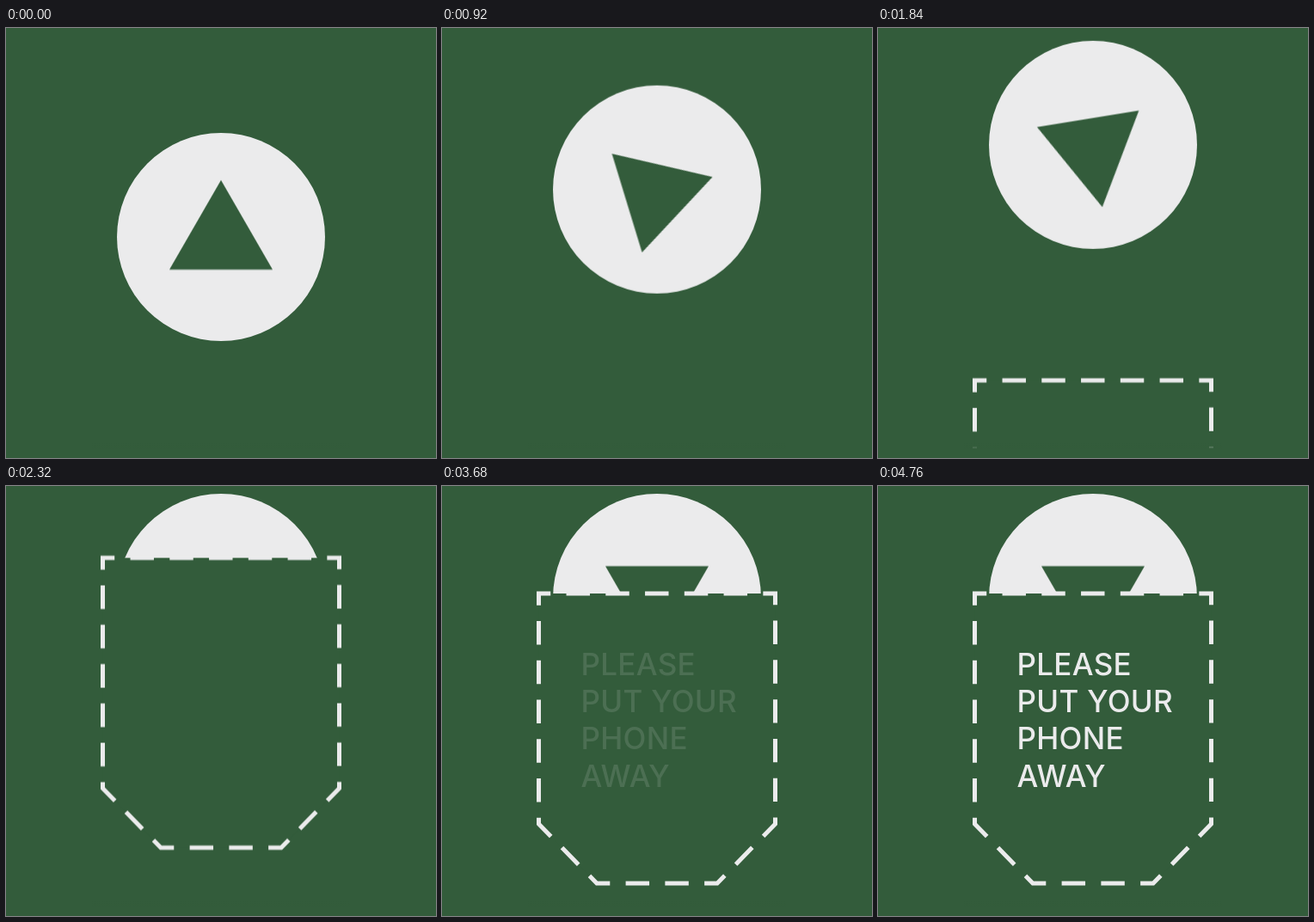
Animation of 500 by 500 pixels, one loop 8000 ms. Source, as an HTML page:

```html
<!DOCTYPE html>
<html lang="en">
<head>
<meta charset="utf-8">
<title>Please put your phone away</title>
<style>
  html, body { margin: 0; width: 100%; height: 100%; overflow: hidden; background: #335c3b; }
  svg { display: block; width: 100vw; height: 100vh; }
  .light { fill: #ebebec; }
  .green { fill: #335c3b; }
  #seam { stroke: #ebebec; stroke-width: 5; stroke-dasharray: 6 4; stroke-dashoffset: 3; }
  #words { font: 500 35px Inter, "Liberation Sans", sans-serif; letter-spacing: .3px; opacity: 0; }
</style>
</head>
<body>
<svg viewBox="0 0 500 500">
  <defs>
    <linearGradient id="fade" x1="0" y1="0" x2="0" y2="1">
      <stop offset="0" stop-color="#335c3b" stop-opacity="0"/>
      <stop offset="1" stop-color="#335c3b"/>
    </linearGradient>
  </defs>
  <g id="disc"><circle class="light" cx="250" r="121"/></g>
  <g id="lift"><path id="spin" class="green" d="M0-67.4 60 36.6H-60Z"/></g>
  <g id="pocket">
    <path id="seam" class="green" pathLength="250"
      d="M112.5 125H387.5V393L320 462H180L112.5 393Z"/>
  </g>
  <rect x="100" y="483" width="300" height="6" fill="url(#fade)"/>
  <rect class="green" x="100" y="489" width="300" height="11"/>
  <g id="words" class="light">
    <text x="161.5" y="220">PLEASE</text>
    <text x="161.5" y="263">PUT YOUR</text>
    <text x="161.5" y="306">PHONE</text>
    <text x="161.5" y="349.5">AWAY</text>
  </g>
</svg>
<script>
  const LOOP = 8000;
  const RISE = 'cubic-bezier(.11, 0, .75, 1)';
  const SMOOTH = 'cubic-bezier(.333, 0, .667, 1)';
  const TURN = 'cubic-bezier(.32, 0, .667, 1)';

  const moveY = y => ({ transform: `translate(0px, ${y}px)` });
  const moveMid = y => ({ transform: `translate(250px, ${y}px)` });
  const rotate = a => ({ transform: `rotate(${a}deg)` });
  const opacity = o => ({ opacity: o });

  // steps: [time in ms, value]; the first and last values are held
  function play(id, style, easing, steps) {
    const all = [...steps, [LOOP, steps[steps.length - 1][1]]];
    if (all[0][0] > 0) all.unshift([0, all[0][1]]);
    const frames = all.map(([t, v]) => ({ ...style(v), offset: t / LOOP, easing }));
    return document.getElementById(id).animate(frames, { duration: LOOP, iterations: Infinity });
  }

  const parts = [
    play('disc', moveY, RISE, [[0, 243], [2100, 130]]),
    play('lift', moveMid, RISE, [[0, 244.4], [2270, 129.7]]),
    play('spin', rotate, TURN, [[0, 0], [2135, 180]]),
    play('pocket', moveY, SMOOTH, [[1600, 367], [2480, -80], [2780, 27], [3080, 0]]),
    play('words', opacity, SMOOTH, [[3360, 0], [4760, 1]])
  ];
  const start = document.timeline.currentTime;
  parts.forEach(p => { p.startTime = start; });
</script>
</body>
</html>
```
